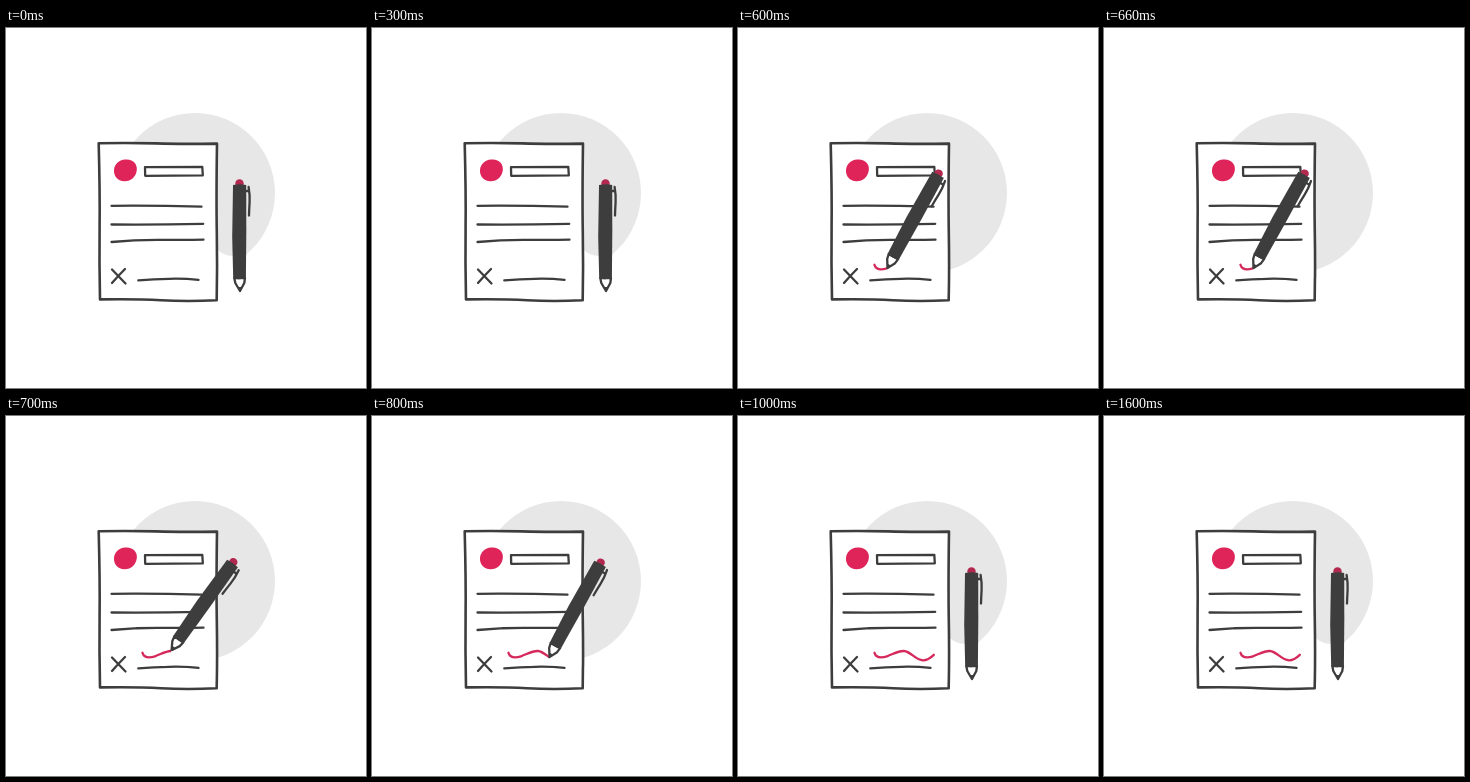
An HTML page that plays this animation: 360x360 px, repeating every 2 s.

```html
<!DOCTYPE html>
<html lang="en">
<head>
<meta charset="utf-8">
<title>Signing a form</title>
<style>
  html, body { margin: 0; width: 100%; height: 100%; overflow: hidden; background: #fff; }
  svg { display: block; width: 100%; height: 100%; }
  .ink { fill: none; stroke: #3e3d3e; stroke-width: 2.3; stroke-linecap: round; stroke-linejoin: round; }
</style>
</head>
<body>
<svg viewBox="0 0 360 360">
  <clipPath id="written"><rect id="reveal" x="130" y="225" width="0" height="30"/></clipPath>

  <circle cx="189" cy="165" r="80" fill="#e7e7e7"/>
  <path id="gap" fill="#fff" d="M210 220Q217 228 227 228L240 227V250H205Z"/>

  <g class="ink">
    <path fill="#fff" stroke-width="2.6" d="M92.7 115.2Q125 114.6 150 115.4T211 115.6Q210.2 170 210.8 205T210.7 272.3Q180 273.6 155 272.2T94 271.4Q93.2 235 93.6 200T92.7 115.2Z"/>
    <path d="M139 139.2L196.3 138.8L196.8 147.3L139.2 147.8Z"/>
    <path d="M105.5 177.8Q150 177.4 195.5 178.7M105.5 196.5Q150 196.9 197.2 195.8M105.5 214Q130 211.6 155 211.8T197.5 211.7"/>
    <path d="M132.3 252.4Q148 251.2 163 250.8T192.5 251.8"/>
    <path d="M106 241.5L119.5 255.5M119 241Q112 248 106 255"/>
  </g>
  <path fill="#df2459" d="M119 131.5C127 130.5 131.5 136 130.8 142C130 149 125 153.3 118.5 153.2C111.5 153 107.6 148 108 142C108.4 136 113 132 119 131.5Z"/>

  <path clip-path="url(#written)" fill="none" stroke="#d6295b" stroke-width="2.3" stroke-linecap="round"
    d="M136.5 236.8C138 241.5 143 242.2 149 240.3C155 238.3 160 234.7 166 235C173 235.5 177 244 185 244.3C190 244.4 193 241.5 195.8 238.8"/>

  <!-- The pen's origin is the point of its nib -->
  <g id="pen">
    <circle cx="-.5" cy="-108.5" r="4.2" fill="#b3284f"/>
    <path class="ink" fill="#fff" style="fill:#fff" stroke-width="2" d="M-5.7 -14L-4.7 -9L0 -1L4.3 -9L5 -14Z"/>
    <path fill="#3e3d3e" d="M-2.5 -5H2.3L.2 0Z"/>
    <path fill="#3e3d3e" d="M-7 -107Q0 -108.3 6.2 -107L6.3 -60L5.9 -14Q0 -12 -6.8 -13.5L-7.8 -55Z"/>
    <path class="ink" d="M5.5 -101H8M8.6 -105Q10 -97 9.6 -90T9 -76.5"/>
  </g>
</svg>
<script>
  const LOOP = 2000, START = 500, STEP = 100;
  const rest = [234, 264, 0];
  // Nib x, nib y, tilt in degrees
  const strokes = [
    [137, 238, 35.5],
    [149, 241, 28.7],
    [165, 235, 35.3],
    [177, 242, 28.7],
    [195, 241, 35.3]
  ];
  const $ = id => document.getElementById(id);

  function draw(now) {
    const t = now % LOOP;
    const step = Math.floor((t - START) / STEP);
    const pose = strokes[step];
    const [x, y, tilt] = pose || rest;
    const inkEnd = step < 1 ? 130 : pose ? x : 200;

    $("pen").setAttribute("transform", `translate(${x} ${y}) rotate(${tilt})`);
    $("reveal").setAttribute("width", inkEnd - 130);
    $("gap").setAttribute("visibility", pose ? "hidden" : "visible");
  }

  const begin = performance.now();
  function tick() {
    draw(performance.now() - begin);
    requestAnimationFrame(tick);
  }
  tick();
</script>
</body>
</html>
```
